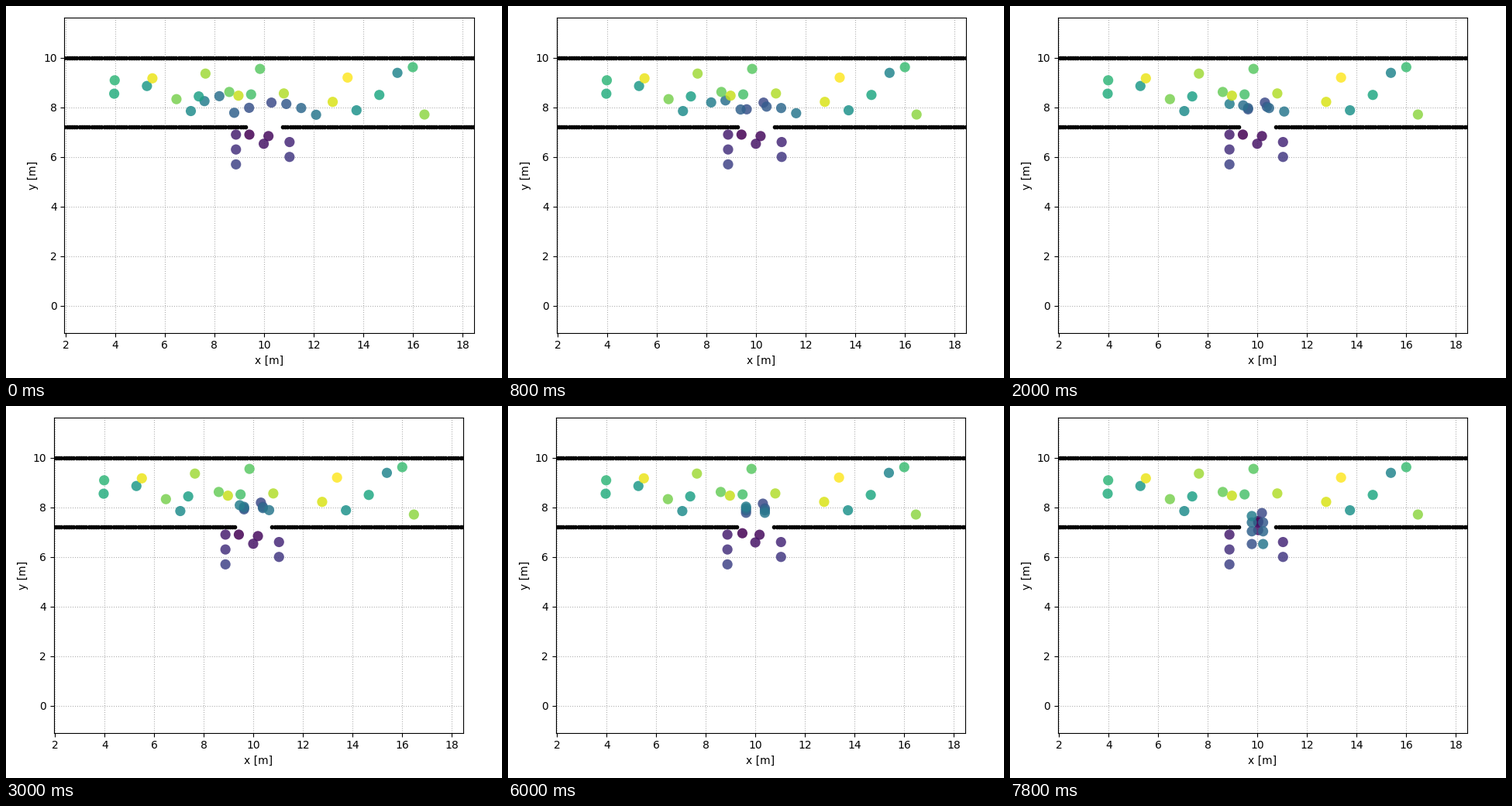
Animation of 640 by 480 pixels, one loop 8000 ms. Source, as a matplotlib script:

```python
import matplotlib.pyplot as plt
import numpy as np
from matplotlib.animation import FuncAnimation

W, H, DPI = 640, 480, 100
FRAMES, INTERVAL = 40, 200
SCALE = 32                      # pixels per metre
LEFT, TOP, WIDTH, HEIGHT = 61.8, 14.75, 528.2, 407
DRIFT = 13.6                    # initial horizontal offset of the axes, halves each frame
X0, Y0 = 1.953, -1.094
DOOR_X, DOOR_HALF, DOOR_Y, BACK_Y = 10, 0.75, 7.2, 10
STEP = 0.1                      # spacing of the wall points
PUSH_START = 29

# People below the door who later push through it
front = np.array([(9.41, 6.90), (10.18, 6.84), (9.99, 6.53)])

# People who stand still, ordered by colour
standing = np.array([
    (15.38, 9.39), (7.05, 7.85), (13.73, 7.88), (5.28, 8.86), (7.37, 8.44),
    (14.65, 8.50), (3.96, 8.55), (3.98, 9.09), (16.00, 9.62), (9.48, 8.52),
    (9.84, 9.55), (8.60, 8.62), (6.47, 8.33), (16.47, 7.71), (7.64, 9.36),
    (10.80, 8.56), (8.97, 8.47), (12.77, 8.22), (5.50, 9.17), (13.37, 9.20),
])

# Two files of people waiting on either side below the door
i = np.arange(3, 8)
aside = np.column_stack([np.where(i % 2, 8.87, 11.03), 6.9 - 0.3 * (i - 3)])

# Two files above the door: odd numbers on the left, even ones on the right
i = np.arange(8, 16)
left = i % 2 == 1
side = np.where(left, -1, 1)
rank = np.where(left, i - 9, 14 - i) / 2
pace = np.where(left, 0.115, 0.09)
arc = 8.19 - 0.0136 * (i - 8) ** 2
rows = 7.98 - 0.1 * (i - 9) + 0.87 * (i > 12)
queue = np.column_stack([DOOR_X + side * (0.3 * i - 2.1), np.where(left, rows, arc)])
goal = np.column_stack([DOOR_X + 0.38 * side, 7.92 + 0.05 * rank])
goal[0] = queue[0]              # already in place
path = goal - queue
length = np.hypot(*path.T)


def move_queue(frame, n):
    """Walk to the door corner, then squeeze through, foremost fastest."""
    walked = pace * frame + 0.065 * min(frame, 2)
    part = np.minimum(walked, length) / np.maximum(length, 1e-9)
    x, y = (queue + path * part[:, None]).T
    narrow = 1 - 0.016 * max(n - 5, 0) ** 2
    return np.column_stack([DOOR_X + (x - DOOR_X) * narrow, y - 0.14 * 0.67 ** rank * n])


def move_front(n):
    """Drift to the middle of the door while climbing."""
    x, y = front.T
    return np.column_stack([x + (DOOR_X + 0.03 - x) * n / 10, y + 0.055 * n])


def positions(frame):
    n = max(frame - PUSH_START, 0)
    return np.vstack([move_front(n), aside, move_queue(frame, n), standing])


def axes_box(frame):
    x = LEFT + DRIFT * 0.5 ** frame
    return [x / W, 1 - (TOP + HEIGHT) / H, WIDTH / W, HEIGHT / H]


fig = plt.figure(figsize=(W / DPI, H / DPI), dpi=DPI)
ax = fig.add_axes(axes_box(0))
ax.set_xlim(X0, X0 + WIDTH / SCALE)
ax.set_ylim(Y0, Y0 + HEIGHT / SCALE)
ax.set_xticks(range(2, 19, 2))
ax.set_yticks(range(0, 11, 2))
ax.set_xlabel("x [m]")
ax.set_ylabel("y [m]")
ax.grid(linestyle="dotted")


def wall(x, y):
    ax.plot(x, np.full_like(x, y), "k.")


reach = STEP * np.arange(100)
wall(2 * reach + 0.05, BACK_Y)
wall(2 * reach + 0.05 + STEP, BACK_Y)
wall(DOOR_X - DOOR_HALF - reach, DOOR_Y)
wall(DOOR_X + DOOR_HALF + reach, DOOR_Y)

people = positions(0)
dots = ax.scatter(*people.T, c=np.arange(len(people)), cmap="viridis",
                  s=90, alpha=0.85, linewidths=0, zorder=2.5)


def update(frame):
    ax.set_position(axes_box(frame))
    dots.set_offsets(positions(frame))
    return (dots,)


anim = FuncAnimation(fig, update, frames=FRAMES, interval=INTERVAL,
                     repeat=True, repeat_delay=0, blit=False)
plt.show()
```
